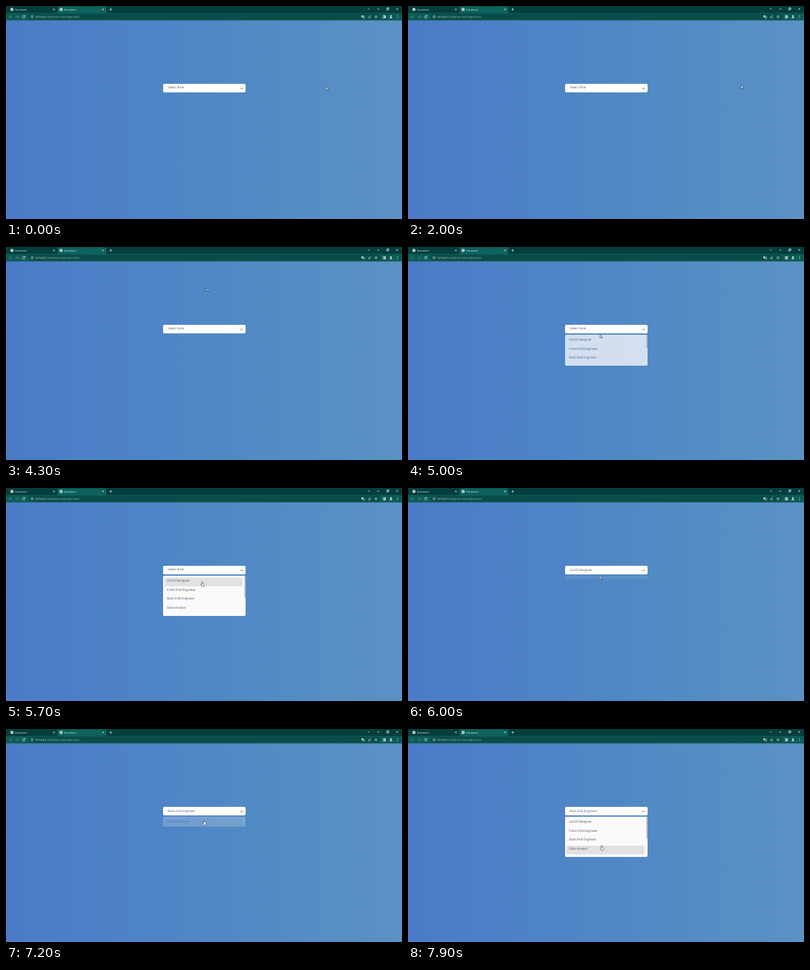
An HTML page for the animation above (8000 ms loop, 600 by 323 pixels).

```html
<!DOCTYPE html>
<html lang="en">
<head>
<meta charset="utf-8">
<title>Role select</title>
<style>
@property --open { syntax: "<number>"; inherits: true; initial-value: 0; }

html, body { margin: 0; width: 100%; height: 100%; overflow: hidden; }
body {
  position: relative;
  font: 4.85px/13.5px "Open Sans", "Noto Sans", sans-serif;
  text-rendering: geometricPrecision;
  background: linear-gradient(to right, #4a7bc8, #518ac5 62%, #5b92c4);
}
svg, .select, .panel { position: absolute; }
svg { left: 0; top: 0; }

/* every track shares the 8 s loop and moves on 100 ms ticks */
.panel, .labels, .chevron, .hover, .cursor, .arrow, .hand {
  animation: 8s step-end -4ms infinite;
}

.line { fill: none; stroke: #e8f3f1; stroke-width: .7; }
.faint { stroke: #5f9691; }
.tab { font-size: 3.7px; fill: #f0f7f6; }
.url { font-size: 4.15px; fill: #fff; }
.path { fill: #9dc0bc; }

.select {
  left: 237.5px; top: 118.3px; width: 125px; height: 13.2px;
  border-radius: 2px; background: #fff; overflow: hidden; color: #50566a;
}
.labels { padding-left: 7.5px; line-height: 13.2px; animation-name: labels; }
.select svg { left: 116px; top: 4.6px; }
.chevron {
  fill: none; stroke: #454b58; stroke-width: .75;
  transform-origin: 2.8px 2px; animation-name: chevron;
}

.panel {
  left: 237.5px; top: 133px; width: 125px;
  height: calc(61px * var(--open)); opacity: var(--open);
  border-radius: 2px; background: #fafafb; overflow: hidden; color: #465065;
  animation-name: open;
}
.panel div { position: absolute; white-space: nowrap; }
.items { left: 6.5px; top: 2.4px; }
.hover {
  left: 2.5px; top: 3px; width: 118px; height: 13px;
  border-radius: 1px; background: #e1e1e2; animation-name: hover;
}
.thumb {
  right: 0; top: 0; width: 1.8px;
  height: calc(33px * var(--open) * var(--open)); background: #c3c6ca;
}

.cursor { animation-name: move; }
.cursor path { fill: #fff; stroke: #1c2430; stroke-width: .55; stroke-linejoin: round; }
.arrow { animation-name: arrow; }
.hand { animation-name: hand; }

@keyframes open {
  0% { --open: 0; }
  61.25% { --open: .2; }
  62.5% { --open: .77; }
  63.75% { --open: .96; }
  65% { --open: 1; }
  73.75% { --open: .45; }
  75% { --open: .08; }
  76.25% { --open: 0; }
  77.5% { --open: .3; }
  78.75% { --open: .8; }
  80% { --open: .97; }
  81.25% { --open: 1; }
  88.75% { --open: .85; }
  90% { --open: .25; }
  91.25% { --open: .03; }
  92.5% { --open: 0; }
  93.75% { --open: .3; }
  95% { --open: .8; }
  96.25% { --open: .97; }
  97.5%, 100% { --open: 1; }
}
@keyframes labels {
  0% { transform: none; }
  72.5% { transform: translateY(-13.2px); }
  88.75%, 100% { transform: translateY(-26.4px); }
}
@keyframes chevron {
  0%, 72.5%, 88.75% { transform: none; }
  61.25%, 77.5%, 93.75%, 100% { transform: scaleY(-1); }
}
@keyframes hover {
  0%, 75%, 91.25% { opacity: 0; transform: none; }
  65%, 78.75%, 90%, 96.25% { opacity: 1; transform: none; }
  80% { opacity: 1; transform: translateY(13.5px); }
  81.25%, 97.5% { opacity: 1; transform: translateY(27px); }
  98.75%, 100% { opacity: 1; transform: translateY(40.5px); }
}
@keyframes move {
  0% { transform: translate(485px, 122.4px); }
  12.5% { transform: translate(498px, 154px); }
  25% { transform: translate(505px, 120.3px); animation-timing-function: steps(6); }
  32.5% { transform: translate(330px, 48px); }
  35% { transform: translate(322px, 46px); }
  37.5% { transform: translate(316px, 48px); }
  41.25% { transform: translate(312px, 51px); }
  46.25% { transform: translate(308px, 100px); }
  47.5% { transform: translate(306px, 147px); }
  50% { transform: translate(306px, 136px); animation-timing-function: steps(3); }
  53.75% { transform: translate(304.8px, 62px); }
  60% { transform: translate(301px, 88px); }
  61.25% { transform: translate(293px, 125px); }
  62.5% { transform: translate(291px, 132.6px); animation-timing-function: steps(4); }
  67.5% { transform: translate(297px, 143px); }
  71.25% { transform: translate(297px, 142px); }
  73.75% { transform: translate(294px, 139px); }
  75% { transform: translate(290.3px, 133.4px); }
  76.25% { transform: translate(290px, 127px); animation-timing-function: steps(4); }
  81.25% { transform: translate(293px, 163px); animation-timing-function: steps(3); }
  85% { transform: translate(298px, 169px); }
  87.5% { transform: translate(298px, 168px); }
  88.75% { transform: translate(299px, 162px); }
  90% { transform: translate(300px, 138.4px); }
  91.25% { transform: translate(297px, 128px); }
  92.5% { transform: translate(296px, 125px); }
  95% { transform: translate(295px, 129px); animation-timing-function: steps(3); }
  98.75%, 100% { transform: translate(293.3px, 176.5px); }
}
@keyframes arrow {
  0%, 62.5%, 75% { opacity: 1; }
  61.25%, 65%, 76.25%, 100% { opacity: 0; }
}
@keyframes hand {
  0%, 62.5%, 75% { opacity: 0; }
  61.25%, 65%, 76.25%, 100% { opacity: 1; }
}
</style>
</head>
<body>

<svg width="600" height="323" viewBox="0 0 600 323">
  <defs>
    <g id="globe">
      <circle r="2.4" fill="#f2f7f6"/>
      <path d="M-1.7-.9 0-.3-.4.7-1.2.9M.5-1.8 1.5-.6.8.6" fill="none" stroke="#16524f" stroke-width=".7"/>
    </g>
    <path id="cross" d="M-1.3-1.3 1.3 1.3M1.3-1.3-1.3 1.3"/>
  </defs>

  <rect width="600" height="11" fill="#043f3d"/>
  <path d="M76 11Q78 11 78 9V2.5Q78 .5 80 .5H150Q152 .5 152 2.5V9Q152 11 154 11Z" fill="#0e625d"/>
  <rect y="10.6" width="600" height="11.4" fill="#0e5c57"/>
  <rect x="34" y="11.8" width="533" height="8.8" rx="4.4" fill="#0a4c48"/>
  <rect y="21.5" width="600" height=".6" fill="#2b6a73"/>

  <use href="#globe" x="9" y="5.2"/>
  <use href="#globe" x="83.5" y="5.2"/>
  <text class="tab" x="13.8" y="6.6">Document</text>
  <text class="tab" x="88" y="6.6">Document</text>

  <g class="line">
    <use href="#cross" x="72.5" y="5.2"/>
    <use href="#cross" x="147" y="5.2"/>
    <use href="#cross" x="592.7" y="4.4"/>
    <path d="M158.7 3.2V7.2M156.7 5.2H160.7"/>
    <path d="M548.2 3.7 549.7 5.1 551.2 3.7M562.5 4.6H565.7"/>
    <path d="M576.7 3.7H579.2V6.1H576.7ZM577.5 3.6V2.8H580V5.3H579.3"/>
    <path class="faint" d="M9.2 16.3H5M7 14.3 5 16.3 7 18.3M14.8 16.3H19M17 14.3 19 16.3 17 18.3"/>
    <path d="M28.6 15.2A2 2 0 1 0 28.9 16.8M28.9 14V15.5H27.3"/>
    <g stroke-width=".5">
      <circle cx="39.6" cy="16.3" r="1.9"/>
      <path d="M39.6 16V17.5M39.6 15V15.5"/>
      <path d="M549 15.8V18H552.2V16.6M550 16.7Q550.2 15 552.3 15M551.4 14 552.5 15 551.4 16"/>
      <path d="M560.7 14.2 561.3 15.6 562.8 15.7 561.7 16.7 562 18.2 560.7 17.4 559.4 18.2 559.7 16.7 558.6 15.7 560.1 15.6Z"/>
      <path d="M541.1 15.5H543.4V18.5H541M542 16.4 541.3 17.8"/>
    </g>
  </g>

  <g fill="#eef6f5">
    <rect x="538.6" y="14.1" width="2.6" height="3.3" fill="#b9d2cf"/>
    <rect x="571" y="14.2" width="4.2" height="4.2" rx=".5"/>
    <rect x="571.7" y="14.9" width="1.5" height="2.8" fill="#0e5c57"/>
    <circle cx="583.3" cy="15.2" r="1.1"/>
    <path d="M581.2 18.3Q581.2 16.6 583.3 16.6T585.4 18.3Z"/>
    <circle cx="593.2" cy="14.6" r=".5"/>
    <circle cx="593.2" cy="16.3" r=".5"/>
    <circle cx="593.2" cy="18" r=".5"/>
  </g>
  <text class="url" x="44" y="17.8">127.0.0.1<tspan class="path">:5500/list-click/index.html</tspan></text>
</svg>

<div class="select">
  <div class="labels">Select Role<br>UI/UX Designer<br>Back End Engineer</div>
  <svg width="6" height="4" viewBox="0 0 6 4"><path class="chevron" d="M.6 1.2 2.8 2.8 5 1.2"/></svg>
</div>

<div class="panel">
  <div class="hover"></div>
  <div class="items">UI/UX Designer<br>Front End Engineer<br>Back End Engineer<br>Data Analyst</div>
  <div class="thumb"></div>
</div>

<svg width="600" height="323" viewBox="0 0 600 323">
  <g class="cursor">
    <path class="arrow" d="M0 0V5L1.2 4 2 5.8 2.9 5.4 2.1 3.7H3.6Z"/>
    <path class="hand" d="M-.6.6Q0-.2.6.6V2.6L2.7 3.1Q3.2 3.3 3.1 4L2.6 6.1V7.3H-.5V6.4L-2 4.4Q-1.6 3.5-.6 4.5Z"/>
  </g>
</svg>

</body>
</html>
```
